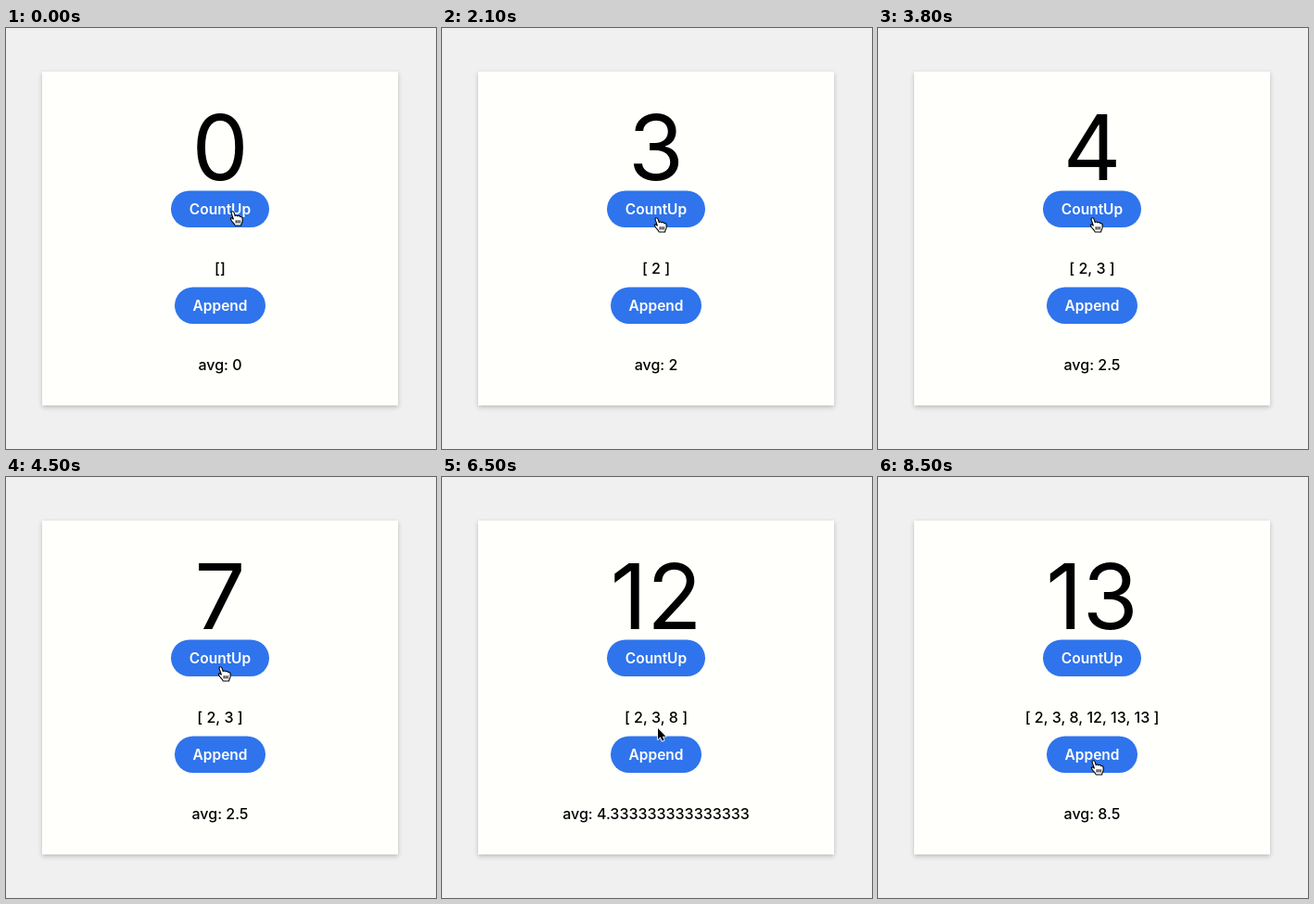
Recreate the animation shown at these times as an HTML page with a canvas. Size 464 by 454 pixels, loop 8600 ms.

```html
<!DOCTYPE html>
<html lang="en">
<head>
<meta charset="utf-8">
<title>Counter</title>
<style>
  html, body { margin: 0; width: 100%; height: 100%; overflow: hidden; background: #f0f0f0; }
  canvas { display: block; }
</style>
</head>
<body>
<canvas id="stage" width="464" height="454"></canvas>
<script>
const ctx = document.getElementById('stage').getContext('2d');
const LOOP = 8600, STEP = 100, CLICK_GAP = 200, CENTER = 231;
const DOWN_TIME = 300, UP_TIME = 360, PAUSE = 100;
const FONT = 'Inter, "Liberation Sans", sans-serif';

const buttons = [
  { label: 'CountUp', y: 175.5, w: 106 },
  { label: 'Append', y: 279.5, w: 98 }
];
const BUTTON_H = 39.5;

// Each round clicks CountUp, glides down, clicks Append and returns
const rounds = [
  { count: 200, counts: 2, append: 1100, appends: 1 },
  { count: 2000, counts: 1, append: 2600, appends: 1 },
  { count: 3800, counts: 5, append: 5200, appends: 1 },
  { count: 5700, counts: 4, append: 6700, appends: 1 },
  { count: 7500, counts: 1, append: 8200, appends: 2 }
];
const START = { x: 245, y: 197 }, HIGH = { x: 232, y: 204 }, LOW = { x: 233, y: 305 };

const clicks = (from, n) => Array.from({ length: n }, (_, i) => from + i * CLICK_GAP);
const countClicks = rounds.flatMap(r => clicks(r.count, r.counts));
const appendClicks = rounds.flatMap(r => clicks(r.append, r.appends));
const countAt = t => countClicks.filter(c => c <= t).length;

function glide(a, b, t, from, time) {
  const k = Math.min(1, Math.max(0, (t - from) / time));
  return { x: a.x + (b.x - a.x) * k, y: a.y + (b.y - a.y) * k };
}

function pointerAt(t) {
  let pos = START;
  for (const { append, appends } of rounds) {
    const leave = append + (appends - 1) * CLICK_GAP + PAUSE;
    pos = glide(pos, LOW, t, append - PAUSE - DOWN_TIME, DOWN_TIME);
    pos = glide(pos, HIGH, t, leave, UP_TIME);
  }
  return pos;
}

const hand = new Path2D('M-2.2 1.2C-2.2-.8.6-.8 1.1 1L2.4 5C3 4 5 4 5.4 5.4C6.2 4.6 8 4.8 8.4 6.2' +
  'C9.4 5.6 11 6.2 11 8V10.5C11 13 9.6 13.5 9.4 16.3H2.4C2 14.5-.5 12.6-2.2 10C-4 7.6-2 6.6 0 8.6L.4 8.8Z');
const knuckles = new Path2D('M3.5 10V13.5M5.7 10V13.5M7.9 10V13.5');
const arrow = new Path2D('M0 0V14L3.2 11L5.3 16L7.8 15L5.7 10.2H10Z');

function drawText(str, y, size, weight, color = '#000') {
  ctx.font = `${weight} ${size}px ${FONT}`;
  ctx.fillStyle = color;
  ctx.fillText(str, CENTER, y);
}

function drawCard() {
  ctx.fillStyle = '#f0f0f0';
  ctx.fillRect(0, 0, 464, 454);
  ctx.save();
  ctx.shadowColor = 'rgba(0,0,0,.22)';
  ctx.shadowBlur = 5;
  ctx.shadowOffsetY = 2;
  ctx.fillStyle = '#fffffc';
  ctx.fillRect(39, 47, 384, 360);
  ctx.restore();
}

function drawButton({ label, y, w }) {
  ctx.fillStyle = '#2f74ec';
  ctx.beginPath();
  ctx.roundRect(CENTER - w / 2, y, w, BUTTON_H, BUTTON_H / 2);
  ctx.fill();
  drawText(label, y + 25.5, 15.5, 600, '#fff');
}

function drawPointer({ x, y }) {
  const over = buttons.some(b => y >= b.y && y <= b.y + BUTTON_H);
  ctx.save();
  ctx.translate(Math.round(x), Math.round(y));
  ctx.lineJoin = 'round';
  if (over) {
    ctx.translate(0, 1);
    ctx.scale(0.92, 0.92);
    ctx.fillStyle = '#fff';
    ctx.strokeStyle = '#000';
    ctx.lineWidth = 1.2;
    ctx.fill(hand);
    ctx.stroke(hand);
    ctx.stroke(knuckles);
  } else {
    ctx.scale(0.85, 0.85);
    ctx.strokeStyle = '#fff';
    ctx.lineWidth = 2;
    ctx.stroke(arrow);
    ctx.fillStyle = '#000';
    ctx.fill(arrow);
  }
  ctx.restore();
}

function draw(t) {
  const list = appendClicks.filter(c => c <= t).map(countAt);
  const avg = list.length ? list.reduce((a, b) => a + b) / list.length : 0;
  ctx.textAlign = 'center';
  drawCard();
  drawText(String(countAt(t)), 164, 97, 400);
  buttons.forEach(drawButton);
  drawText(list.length ? `[ ${list.join(', ')} ]` : '[]', 265, 16, 500);
  drawText(`avg: ${avg}`, 369, 16, 500);
  drawPointer(pointerAt(t));
}

function tick() {
  draw(Math.floor(performance.now() % LOOP / STEP) * STEP);
  requestAnimationFrame(tick);
}
tick();
</script>
</body>
</html>
```
